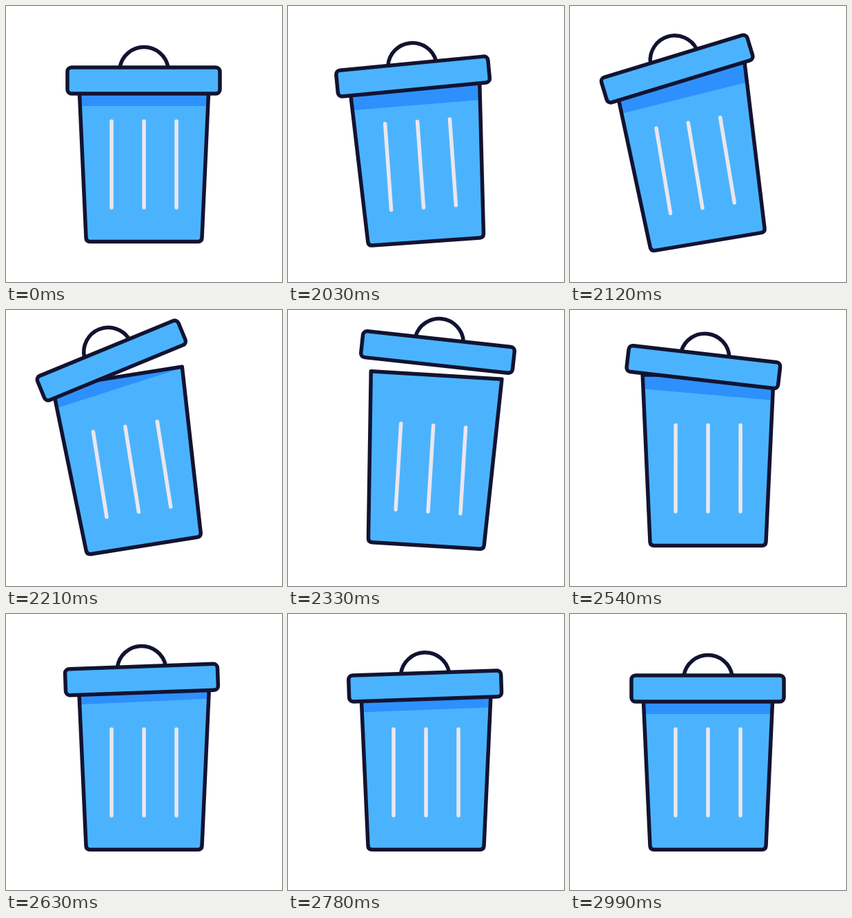
An HTML page for the animation above (3050 ms loop, 400 px wide and 400 px high).

```html
<!DOCTYPE html>
<html lang="en">
<head>
<meta charset="utf-8">
<title>Trash can</title>
<style>
  html, body { margin: 0; height: 100%; overflow: hidden; background: #fff; }
  svg { display: block; width: 100%; height: 100%; }
  .line { stroke: #121331; stroke-width: 5.5; stroke-linejoin: round; stroke-linecap: round; }
</style>
</head>
<body>
<svg viewBox="0 0 400 400">
  <defs>
    <path id="shape" d="M105 94H295L284 336Q283.6 341.5 278 341.5H122Q116.4 341.5 116 336Z"/>
    <clipPath id="inside"><use href="#shape"/></clipPath>
  </defs>
  <g id="can">
    <use href="#shape" fill="#4bb3fd"/>
    <g clip-path="url(#inside)">
      <rect id="shade" x="40" y="45" width="320" height="100" fill="#2e90fd"/>
    </g>
    <use href="#shape" class="line" fill="none"/>
    <path d="M153 167V292M200 167V292M247 167V292" stroke="#ebe6ef" stroke-width="5.5" stroke-linecap="round"/>
    <g id="lid" class="line">
      <path d="M165 89A35.5 35.5 0 0 1 235 89" fill="none"/>
      <rect x="89" y="89" width="221" height="38" rx="6" fill="#4bb3fd"/>
    </g>
  </g>
</svg>
<script>
const LOOP = 3050, START = 2030, STEP = 30;

// time, can angle, lid x, lid y, lid angle, shade y, shade angle
const keys = [
  [2000, 0, 0, 0, 0, 0, 0],
  [2030, -4.1, -1.3, -6.7, -1.4, -2, -0.6],
  [2150, -10, -3, -26, -9.5, -20, -6],
  [2210, -9, -4.2, -39, -13.4, -34.6, -8.8],
  [2330, 3.5, 0.4, -47.5, 2.7, -54, 1],
  [2450, 2, -8.8, -37.5, 15.4, -27.7, 13.5],
  [2550, 0, -6, -24, 5.5, -22, 4],
  [2630, 0, -3, -13, -2, -18, -2.5],
  [2720, 0, -1.3, -5.5, -2.2, -9, -2.5],
  [2990, 0, 0, 0, 0, 0, 0]
];

const rate = (i, c) => (keys[i + 1][c] - keys[i][c]) / (keys[i + 1][0] - keys[i][0]);

// Slope at a key: flat at turning points, so curves never overshoot
function slope(i, c) {
  if (i === 0 || i === keys.length - 1) return 0;
  const a = rate(i - 1, c), b = rate(i, c);
  return a * b > 0 ? 2 * a * b / (a + b) : 0;
}

function value(t, c) {
  const last = keys.length - 1;
  if (t < START || t >= keys[last][0]) return 0;
  let i = 0;
  while (t >= keys[i + 1][0]) i++;
  const span = keys[i + 1][0] - keys[i][0];
  const u = (t - keys[i][0]) / span, v = 1 - u;
  return v * v * (1 + 2 * u) * keys[i][c] + u * u * (3 - 2 * u) * keys[i + 1][c]
    + span * u * v * (v * slope(i, c) - u * slope(i + 1, c));
}

const [can, lid, shade] = ["can", "lid", "shade"].map(id => document.getElementById(id));

function draw(now) {
  const t = now % LOOP;
  const time = START + Math.floor((t - START) / STEP) * STEP;
  const [turn, lidX, lidY, lidTurn, shadeY, shadeTurn] = [1, 2, 3, 4, 5, 6].map(c => value(time, c));
  can.setAttribute("transform", `rotate(${turn} 200 341)`);
  lid.setAttribute("transform", `translate(${lidX} ${lidY}) rotate(${lidTurn} 199.5 108)`);
  shade.setAttribute("transform", `translate(0 ${shadeY}) rotate(${shadeTurn} 200 145)`);
  requestAnimationFrame(draw);
}
requestAnimationFrame(draw);
</script>
</body>
</html>
```
